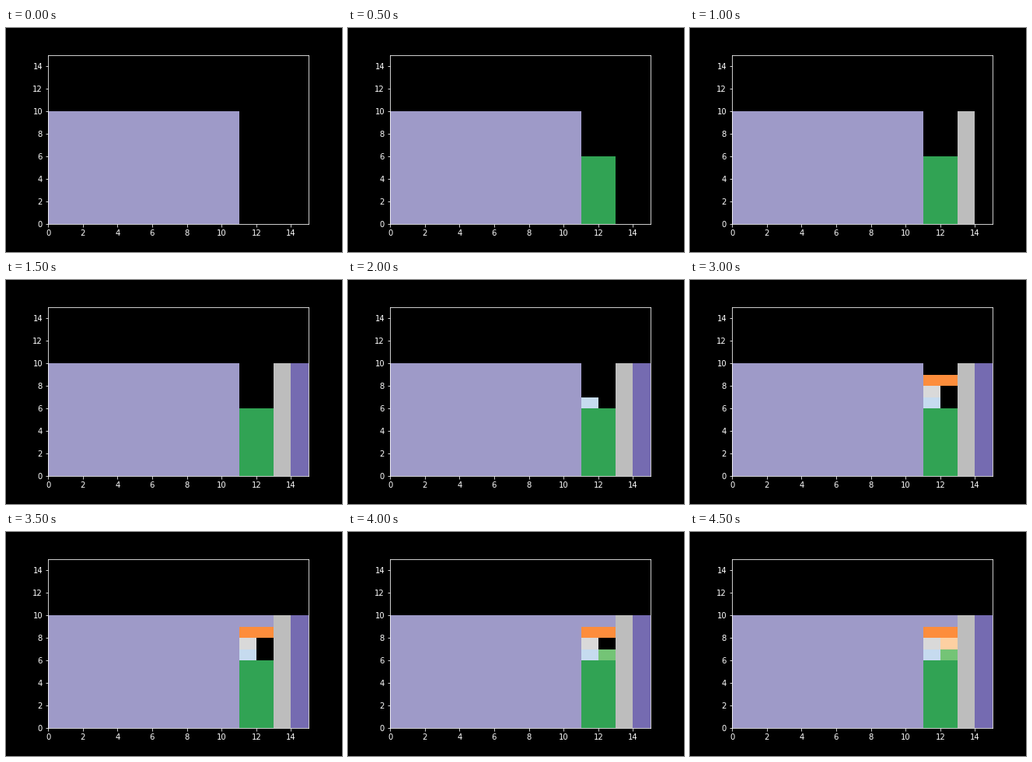
These frames come from a looping animation (432x288 px, 5 s). A matplotlib script:

```python
import matplotlib.pyplot as plt
from matplotlib.animation import FuncAnimation
from matplotlib.patches import Rectangle

plt.style.use("dark_background")

SIZE = 15
STEP_MS = 500

# x, y, width, height, colour, in order of placement
BLOCKS = [
    (0, 0, 11, 10, "#9e9ac8"),
    (11, 0, 2, 6, "#31a354"),
    (13, 0, 1, 10, "#bdbdbd"),
    (14, 0, 1, 10, "#756bb1"),
    (11, 6, 1, 1, "#c6dbef"),
    (11, 7, 1, 1, "#d9d9d9"),
    (11, 8, 2, 1, "#fd8d3c"),
    (11, 9, 2, 1, "#9e9ac8"),
    (12, 6, 1, 1, "#74c476"),
    (12, 7, 1, 1, "#fdd0a2"),
]

fig = plt.figure(figsize=(6, 4), dpi=72)
ax = fig.add_axes([0.125, 0.125, 0.775, 0.755])
ax.set_xlim(0, SIZE)
ax.set_ylim(0, SIZE)
ax.set_xticks(range(0, SIZE, 2))
ax.set_yticks(range(0, SIZE, 2))

rects = [
    ax.add_patch(Rectangle((x, y), w, h, facecolor=color, linewidth=0))
    for x, y, w, h, color in BLOCKS
]


def update(step):
    for i, rect in enumerate(rects):
        rect.set_visible(i <= step)
    return rects


anim = FuncAnimation(
    fig,
    update,
    frames=len(BLOCKS),
    init_func=lambda: update(0),
    interval=STEP_MS,
    repeat=True,
    repeat_delay=0,
)

plt.show()
```
